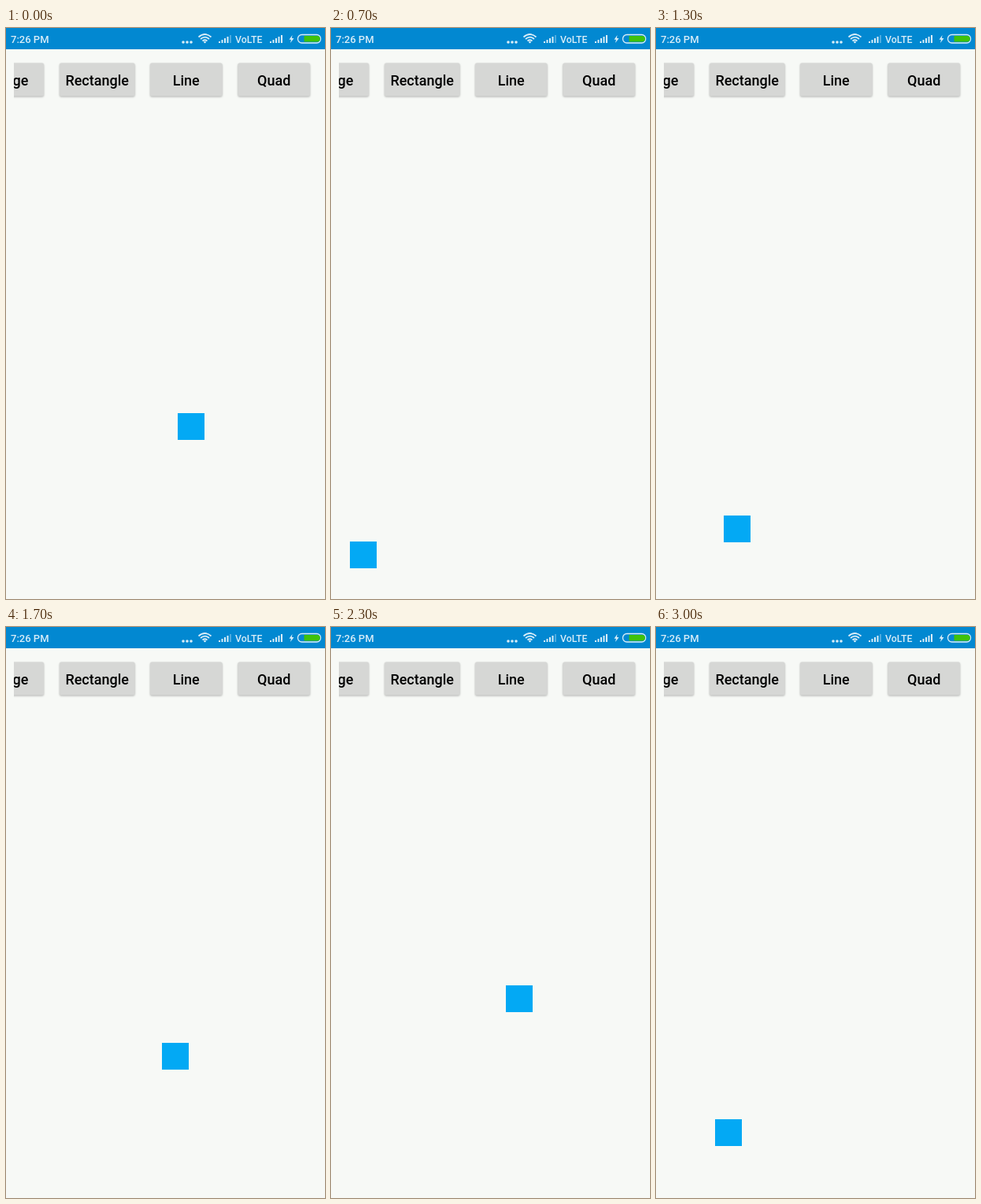
These frames come from a looping animation (405x725 px, 3100 ms). An HTML page:

```html
<!DOCTYPE html>
<html lang="en">
<head>
<meta charset="utf-8">
<title>Quad path</title>
<style>
  html, body { margin: 0; width: 100%; height: 100%; overflow: hidden; background: #f7f9f6; }
  svg { display: block; }
  text { font-family: Roboto, sans-serif; font-weight: 500; }
  .status text { font-size: 13px; fill: #d9edf8; }
  .buttons rect { fill: #d6d7d5; filter: drop-shadow(0 1px 1px rgba(0, 0, 0, .28)); }
  .buttons text { font-size: 18px; text-anchor: middle; }
</style>
</head>
<body>
<svg width="405" height="725" viewBox="0 0 405 725">
  <defs>
    <clipPath id="strip"><rect x="10" y="30" width="395" height="70"/></clipPath>
    <g id="signal">
      <path d="M0 19v-2h2v2zM3.5 19v-4h2v4zM7 19v-6h2v6zM10.5 19v-8h2v8z"/>
      <path d="M14 19V9h2v10z" class="last"/>
    </g>
  </defs>

  <rect width="405" height="27" fill="#0288d1"/>
  <g class="status" fill="#d9edf8">
    <text x="6" y="18.5">7:26 PM</text>
    <circle cx="225" cy="18" r="1.8"/>
    <circle cx="230" cy="18" r="1.8"/>
    <circle cx="235" cy="18" r="1.8"/>
    <g fill="none" stroke="#d9edf8" stroke-width="1.7">
      <path d="M244.5 11.5Q252.5 4.5 260.5 11.5"/>
      <path d="M247 14Q252.5 9.3 258 14"/>
      <path d="M249.5 16.5Q252.5 14 255.5 16.5"/>
    </g>
    <circle cx="252.5" cy="18" r="1.3"/>
    <use href="#signal" x="270" style="--last: .35"/>
    <text x="291" y="18.5" style="font-size: 12.3px">VoLTE</text>
    <use href="#signal" x="335"/>
    <path d="M363.5 9L359.5 14.7H362L361 19L365.5 13H362.8Z"/>
    <rect x="370.5" y="8.5" width="29" height="10.5" rx="5" fill="none" stroke="#d9edf8" stroke-width="1.3"/>
    <path d="M378.5 10H395a3.7 3.7 0 0 1 0 7.5H378.5Z" fill="#3fc20c"/>
  </g>

  <g class="buttons" clip-path="url(#strip)"></g>
  <rect id="box" width="34" height="34" fill="#03a9f4"/>
</svg>
<script>
  const LOOP = 3100, STEP = 100;

  document.querySelector('.buttons').innerHTML = [
    [-44, 92, 'Range'], [68, 95.5, 'Rectangle'], [183, 91.5, 'Line'], [294.5, 91.5, 'Quad']
  ].map(([x, w, label]) => {
    const cut = x < 0;
    return `<rect x="${x}" y="44.5" width="${w}" height="42" rx="2"/>
      <text x="${cut ? 28.5 : x + w / 2}" y="72.5"${cut ? ' style="text-anchor: end"' : ''}>${label}</text>`;
  }).join('');

  // The box rides a sideways parabola, back and forth, at even speed along the curve.
  const BEND = 0.0054, TIP_X = 222.3, TIP_Y = 460;
  const curveX = y => TIP_X - BEND * (y - TIP_Y) ** 2;

  function arc(y) {
    const v = 2 * BEND * (y - TIP_Y);
    return (v * Math.hypot(1, v) + Math.asinh(v)) / (4 * BEND);
  }

  function yAtArc(len) {
    let lo = 300, hi = 750;
    for (let i = 0; i < 30; i++) {
      const mid = (lo + hi) / 2;
      if (arc(mid) < len) lo = mid; else hi = mid;
    }
    return lo;
  }

  // [time, y]
  const keys = [
    [0, 489], [400, 595.4], [600, 633.4], [800, 669], [908, 683], [1000, 667.9],
    [1200, 637], [1300, 618.9], [1700, 527.6], [1800, 497], [2100, 379],
    [2300, 455.5], [3000, 625], [LOOP, 645]
  ];

  function yAt(t) {
    const i = keys.findIndex(k => k[0] > t);
    const [t0, y0] = keys[i - 1], [t1, y1] = keys[i];
    const a = arc(y0), b = arc(y1);
    return yAtArc(a + (b - a) * (t - t0) / (t1 - t0));
  }

  const box = document.getElementById('box');
  const start = performance.now();

  function draw(now) {
    const t = Math.max(0, now - start) % LOOP;
    const y = yAt(Math.floor(t / STEP) * STEP);
    box.setAttribute('x', Math.round(curveX(y)));
    box.setAttribute('y', Math.round(y));
    requestAnimationFrame(draw);
  }
  draw(start);
</script>
<style>.last { opacity: var(--last, 1); }</style>
</body>
</html>
```
